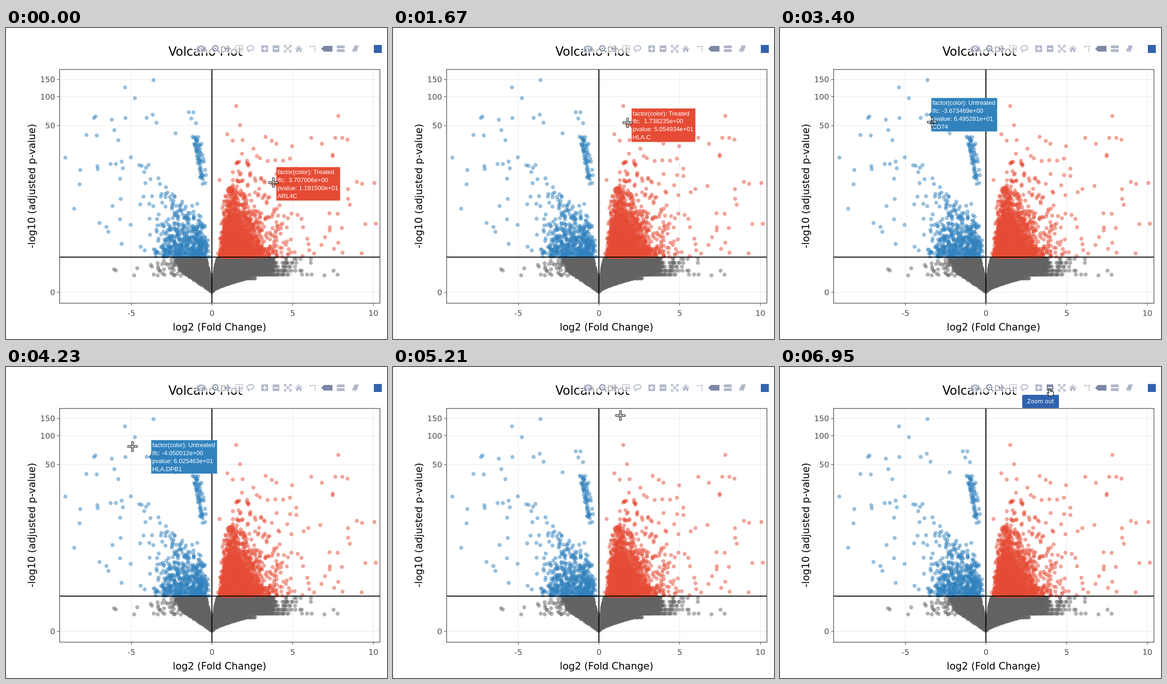
Animation, 810 px wide and 660 px high, one loop 8 s. Source, as an HTML page with a canvas:

```html
<!DOCTYPE html>
<html lang="en">
<head>
<meta charset="utf-8">
<title>Volcano Plot</title>
<style>
html, body { margin: 0; width: 100%; height: 100%; overflow: hidden; background: #fff; }
canvas, svg { position: absolute; left: 0; top: 0; width: 810px; height: 660px; }
text { font-family: "DejaVu Sans", sans-serif; white-space: pre; }
.tick { font-size: 16.7px; fill: #4d4d4d; }
.label { font-size: 21px; text-anchor: middle; }
.hover text { font: 13px "Liberation Sans", Arial, sans-serif; fill: #fff; }
.icon { fill: #445480; stroke: none; opacity: .42; }
.icon.line { fill: none; stroke: #445480; stroke-width: 2; }
.icon.on { opacity: .7; }
</style>
</head>
<body>
<canvas id="dots" width="810" height="660"></canvas>
<svg viewBox="0 0 810 660" width="810" height="660">
  <path d="M114 486.3H795" stroke="#000" stroke-width="2"/>
  <path d="M437.7 88V584" stroke="#000" stroke-width="2.1"/>
  <rect x="114" y="88" width="681" height="496" fill="none" stroke="#333" stroke-width="1.2"/>
  <g id="axes"></g>
  <text class="label" x="424" y="59" style="font-size:25.8px">Volcano Plot</text>
  <text class="label" x="454" y="641.5">log2 (Fold Change)</text>
  <text class="label" transform="translate(62 335.5) rotate(-90)">-log10 (adjusted p-value)</text>
  <g id="bar">
    <rect x="403" y="35" width="401" height="18.5" fill="#fff" opacity=".7"/>
    <g id="icons"></g>
    <rect x="782" y="36" width="17" height="17" fill="#3463ae"/>
  </g>
  <g id="tip">
    <path d="M569 60l5-6 5 6z" fill="#3062ae"/>
    <rect x="515" y="59" width="78" height="28" rx="2" fill="#3062ae"/>
    <text x="554" y="77" font-size="11.8" fill="#fff" text-anchor="middle">Zoom out</text>
  </g>
  <g class="hover" id="hover">
    <path id="box"/>
    <text></text><text></text><text></text><text></text>
  </g>
  <g id="cross" fill="#fff" stroke="#000" stroke-width="1.1">
    <path d="M-1.8-10h3.6v7h-3.6zM-1.8 3h3.6v7h-3.6zM-10-1.8h7v3.6h-7zM3-1.8h7v3.6h-7z"/>
    <path d="M-.6 0h1.2" stroke-width="1.2"/>
  </g>
  <path id="arrow" d="M0-8V7l3.5-3.3 2.6 6 2.3-1-2.6-5.8h4.8z" fill="#fff" stroke="#000"/>
  <path id="hand" d="M-2.5 3V-5.5q0-1.6 1.5-1.6t1.5 1.6V-1.5q1.4-.9 2.5.4 1.5-.7 2.4.6 2.1-.4 2.1 1.6V4q0 2-1.5 4H-2.5Q-4 5-6.3 2.2q.6-2 2.6-.5z" fill="#fff" stroke="#000" stroke-width="1.1" stroke-linejoin="round"/>
</svg>
<script>
const LOOP = 8000;
const RED = '#e64b35', BLUE = '#3182bd', GREY = '#636363';
const CUT = 486; // height of the significance line
const $ = id => document.getElementById(id);
const px = fc => 438 + 34.3 * fc;
const py = p => 561 - 90 * Math.log1p(p);

// Hover labels: start, end, fold change, p-value, gene
const labels = [
  [0, 700, 3.707006, 11.915, 'ARL4C'],
  [860, 1450, 2.968923, 22.65319, 'IFITM1'],
  [1450, 1790, 1.738235, 50.54934, 'HLA.C'],
  [1790, 2530, 1.502915, 79.98312, 'IFI6'],
  [2650, 3050, -1.441659, 68.94611, 'RPL18A'],
  [3330, 3900, -3.673469, 64.95281, 'CD74'],
  [4120, 4480, -4.050012, 60.25463, 'HLA.DPB1'],
  [4640, 4830, -5.393586, 124.6072, 'MT1X']
];

let seed = 20417;
function rnd() {
  seed = seed + 0x6d2b79f5 | 0;
  let t = Math.imul(seed ^ seed >>> 15, 1 | seed);
  t = t + Math.imul(t ^ t >>> 7, 61 | t) ^ t;
  return ((t ^ t >>> 14) >>> 0) / 4294967296;
}
const span = (a, b) => a + (b - a) * rnd();
const expo = mean => -Math.log(1 - rnd()) * mean;
const many = (n, place) => { while (n--) place(); };

// Scatter
const ctx = $('dots').getContext('2d');
function dot(x, y) {
  if (x < 120 || x > 790) return;
  ctx.beginPath();
  ctx.arc(x, y, 4.25, 0, 7);
  ctx.fill();
}
function group(color, keyPoints) {
  ctx.fillStyle = color;
  keyPoints.forEach(([x, y]) => dot(x, y));
}
const labelled = up => labels.filter(l => l[2] > 0 === up).map(l => [px(l[2]), py(l[3])]);

function drawGrid() {
  ctx.strokeStyle = '#ebebeb';
  ctx.lineWidth = 1.3;
  ctx.beginPath();
  for (const fc of [-5, 0, 5, 10]) { ctx.moveTo(px(fc), 88); ctx.lineTo(px(fc), 584); }
  for (const p of [0, 50, 100, 150]) { ctx.moveTo(114, py(p)); ctx.lineTo(795, py(p)); }
  ctx.stroke();
  ctx.fillStyle = '#ececec';
  ctx.fillRect(0, 0, 1, 660);
}

function drawGrey() {
  group(GREY, [[705, 523.5], [677, 525], [279, 510]]);
  const notch = (d, width) => width * Math.max(0, (d - 18) / 54);
  many(1500, () => {
    const d = 72 * Math.sqrt(rnd());
    const edge = Math.min(1.5 * d, 40 + .52 * d) * span(.88, 1.04);
    dot(438 - span(notch(d, 13), edge), 561 - d);
  });
  many(3300, () => {
    const d = 72 * Math.sqrt(rnd());
    const dx = span(notch(d, 11), Math.min(129, 32 * (d / 17) ** 1.6));
    const row = dx > 78 ? 38 + Math.round((d - 38) / 8.3) * 8.3 : d;
    dot(438 + dx, 561 - Math.min(row, 72));
  });
  many(48, () => dot(372 - expo(28), span(490, 527)));
  many(85, () => dot(564 + expo(26), 490 + 8.3 * Math.floor(span(0, 5))));
}

function drawBlue() {
  group(BLUE, [...labelled(false), [313.5, 110.5], [274, 149], [187, 191], [225, 194.5],
    [254, 191], [171, 227], [193, 228], [158, 301.5], [145, 383.5], [398.5, 179], [394, 192],
    [404, 202], [360.5, 223.5], [320, 201]]);
  many(62, () => {
    const h = span(0, 108);
    dot(404 + .14 * h + (rnd() + rnd() - 1) * 11, 227 + h);
  });
  many(230, () => {
    const dx = expo(68);
    dot(418 - dx, CUT - rnd() * (70 + 1.1 * dx));
  });
  many(350, () => {
    const h = expo(32) % 140;
    dot(433 - .08 * h - (100 - .2 * h) * rnd() - expo(4), CUT - h);
  });
}

function drawRed() {
  group(RED, [...labelled(true), [706.5, 186.5], [470.5, 225.5], [552, 231], [565, 239.5],
    [482, 239], [503, 238], [649, 233], [700, 233], [715, 233], [726, 237], [694.5, 272],
    [746, 326.5], [727, 342], [764, 416], [454, 322.5]]);
  many(340, () => {
    const h = expo(98);
    if (h < 245) dot(478 + expo(62), CUT - h);
  });
  many(1750, () => {
    const h = expo(42), wide = 15.5 * (1 - h / 260);
    if (h < 150) dot(448 + .11 * h + expo(wide) + expo(wide) + expo(wide), CUT - h);
  });
}

drawGrid();
ctx.globalAlpha = .5;
drawGrey();
drawBlue();
drawRed();

// Axes
const xTick = fc => `<path d="M${px(fc)} 584v5" stroke="#333"/>
  <text class="tick" x="${px(fc)}" y="610.5" text-anchor="middle">${fc}</text>`;
const yTick = p => `<path d="M108.5 ${py(p)}h5" stroke="#333"/>
  <text class="tick" x="104.5" y="${py(p) + 6}" text-anchor="end">${p}</text>`;
$('axes').innerHTML = [-5, 0, 5, 10].map(xTick).join('') + [0, 50, 100, 150].map(yTick).join('');

// Toolbar icons: centre x, path around (0,0), class
const dashes = [-7, -3, 1, 5].map(v =>
  `M${v}-8h2.4v2.4h-2.4zM${v} 5h2.4v2.4h-2.4zM-8 ${v}h2.4v2.4h-2.4zM6 ${v}h2.4v2.4h-2.4z`).join('');
const icons = [
  [415, 'M-9-5h4l1.5-2h7l1.5 2h4v11h-18zM0-3.5a4 4 0 1 0 .01 0zM0-1.5a2 2 0 1 1-.01 0z', ''],
  [446, 'M-1-6.5a5.5 5.5 0 1 0 .01 0zM3 3l5 5M-3-1h4', 'line on'],
  [471, 'M0-8l3 3.5h-2v3.5h3.5v-2l3.5 3-3.5 3v-2h-3.5v3.5h2l-3 3.5-3-3.5h2v-3.5h-3.5v2l-3.5-3 3.5-3v2h3.5v-3.5h-2z', ''],
  [495, dashes, ''],
  [519, 'M-3 3.5C-10 1-7-6 1-6.5S10 1 3 3 -5 1-4 5l2 2.5', 'line'],
  [550, 'M-7-7h14v14h-14zM-1.2-4.5v3.3h-3.3v2.4h3.3v3.3h2.4v-3.3h3.3v-2.4h-3.3v-3.3z', ''],
  [574, 'M-7-7h14v14h-14zM-4.5-1.2v2.4h9v-2.4z', '', 'minus'],
  [599, 'M-7-3v-4h4M3-7h4v4M7 3v4h-4M-3 7h-4v-4M-5-5l10 10M5-5l-10 10', 'line'],
  [622.5, 'M0-7l8 7-1 1-7-6-7 6-1-1zM-5.5 1.5l5.5-5 5.5 5v5.5h-4v-4h-3v4h-4z', ''],
  [652, 'M-6-6h3v3h-3zM-1-6h2.5v2.5h-2.5zM3.5-6h3v3h-3zM3.7-1h2.5v2.5h-2.5zM3.7 3.5h2.5v2.5h-2.5z', ''],
  [683, 'M-13 0l6-6h18v12h-18z', 'on'],
  [711, 'M-9-4l3-3h15v6h-15zM-9 4l3-3h15v6h-15z', ''],
  [743, 'M-2-7h9l-4 12h-9zM-4-5l-3 9q0 3 3 3h7v-1h-7q-2 0-1.5-2z', '']
];
$('icons').innerHTML = icons.map(([x, d, cls, id = '']) =>
  `<path id="${id}" class="icon ${cls}" fill-rule="evenodd" transform="translate(${x} 44)" d="${d}"/>`).join('');

const sci = v => v.toExponential(6).replace(/e([+-])(\d)$/, 'e$10$2');
const lines = [...document.querySelectorAll('#hover text')];
let shown = null;

function showLabel(item) {
  $('hover').style.display = item ? '' : 'none';
  if (!item || item === shown) return;
  shown = item;
  const [, , fc, p, gene] = item, up = fc > 0;
  const x = px(fc) + 9.7, y = py(p), w = up ? 135.5 : 140;
  const rows = [`factor(color): ${up ? 'Treated' : 'Untreated'}`,
    `lfc: ${up ? ' ' : ''}${sci(fc)}`, `pvalue: ${sci(p)}`, gene];
  $('box').setAttribute('d', `M${x - 6} ${y}l6-6v-29.5h${w}v71h${-w}v-29.5z`);
  $('box').setAttribute('fill', up ? RED : BLUE);
  lines.forEach((el, i) => {
    el.textContent = rows[i];
    el.setAttribute('x', x + 2.3);
    el.setAttribute('y', y - 20.6 + 16.9 * i);
  });
}

// Pointer stops: time, x, y
const path = [
  [0, 568.5, 328], [120, 568.5, 328], [980, 533, 264], [1750, 495, 194], [1830, 478, 172],
  [2150, 478, 172], [2320, 489, 156], [2490, 489, 156], [2730, 354, 184], [3270, 328, 205],
  [3780, 310, 184], [3920, 310, 184], [4230, 269, 169], [4710, 254, 112], [5210, 483, 103],
  [5540, 655, 61], [6110, 798, 416], [6790, 574, 53], [LOOP, 574, 53]
];
function pointerAt(t) {
  const i = path.findIndex(k => k[0] > t), a = path[i - 1], b = path[i];
  const f = (t - a[0]) / (b[0] - a[0]);
  return [a[1] + (b[1] - a[1]) * f, a[2] + (b[2] - a[2]) * f];
}

const clamp = v => Math.max(0, Math.min(1, v));
function draw(t) {
  const [x, y] = pointerAt(t);
  const away = t >= 5540 && t < 6110;
  const kind = away ? '' : t >= 6950 ? 'hand' : y < 88 ? 'arrow' : 'cross';
  for (const id of ['cross', 'arrow', 'hand']) {
    $(id).style.display = id === kind ? '' : 'none';
    $(id).setAttribute('transform', `translate(${x} ${y})`);
  }
  showLabel(labels.find(l => t >= l[0] && t < l[1]));
  $('bar').setAttribute('opacity', t < 6110 ? 1 - clamp((t - 5560) / 280) : clamp((t - 6110) / 280));
  const zoom = t >= 6750;
  $('tip').style.display = zoom ? '' : 'none';
  $('minus').classList.toggle('on', zoom);
}

const start = performance.now();
function tick(now) {
  draw(Math.max(0, now - start) % LOOP);
  requestAnimationFrame(tick);
}
draw(0);
requestAnimationFrame(tick);
</script>
</body>
</html>
```
